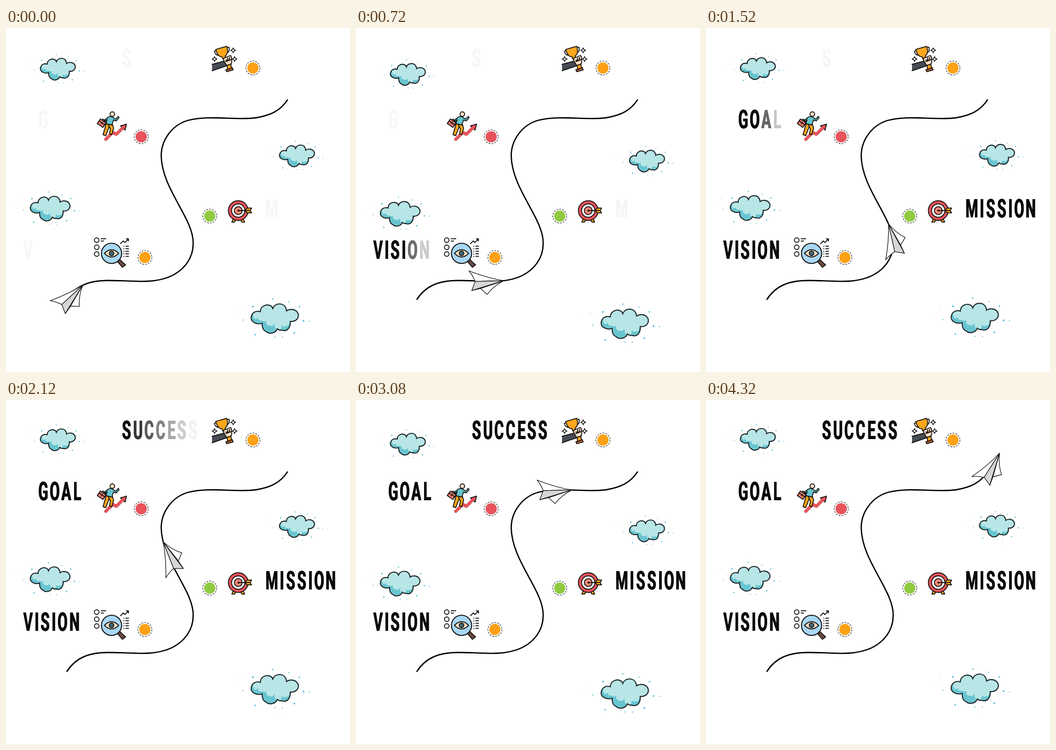
Animation of 748 by 748 pixels, one loop 7.8 s. Source, as an HTML page:

```html
<!DOCTYPE html>
<html lang="en">
<head>
<meta charset="utf-8">
<title>Vision, mission, goal, success</title>
<style>
html, body { margin: 0; width: 100%; height: 100%; overflow: hidden; background: #fff; }
svg { position: absolute; left: 0; top: 0; }
.letter {
  position: absolute; color: #0b0b0c; white-space: pre;
  font: 700 55px/56px Roboto, "Liberation Sans", sans-serif;
  text-shadow: 1px 0 currentColor, -1px 0 currentColor;
  transform: translateX(-50%) scaleX(.57);
}
.ink { stroke: #111; stroke-width: 1.9; stroke-linecap: round; stroke-linejoin: round; fill: none; }
.ink .o { fill: #fda61a; }
.ink .r { fill: #e9535a; }
.ink .skin { fill: #fbdcc0; }
</style>
</head>
<body>
<svg id="stage" width="748" height="748" viewBox="0 0 748 748">
  <defs>
    <path id="puff" vector-effect="non-scaling-stroke" d="M25 42C13 46 0 39 1 29C3 18 12 14 21 17C21 5 35 -2 45 5Q47 7 48 10C53 -3 71 -3 76 8Q78 11 78 15C87 9 99 12 103 21C106 31 98 39 86 38C87 53 78 61 68 57Q62 58 58 54C54 65 39 66 34 60C26 57 25 50 25 42Z"/>
    <clipPath id="puffClip"><use href="#puff"/></clipPath>
    <g id="cloud">
      <use href="#puff" x="3" y="-2" fill="#b9dfe4" opacity=".45"/>
      <use href="#puff" fill="#68c5d0"/>
      <g clip-path="url(#puffClip)" fill="#b8e6e7">
        <path d="M8 32Q-2 10 20 10V-5H108V40H84Q84 50 76 48Q72 52 68 46Q67 58 60 56Q51 56 52 42Q48 50 41 47Q32 46 34 36Q30 40 24 36Q16 38 16 30Q12 34 8 32Z"/>
      </g>
      <use href="#puff" fill="none" stroke="#1d2224" stroke-width="2.2"/>
      <g id="specks" fill="#5cbddc"></g>
    </g>
    <path id="star" d="M0 -5.5Q1 -1 5.5 0Q1 1 0 5.5Q-1 1 -5.5 0Q-1 -1 0 -5.5Z"/>
  </defs>

  <g id="clouds"></g>

  <g class="ink" id="magnifier">
    <circle cx="197.3" cy="461.3" r="5"/><circle cx="197.3" cy="476.8" r="5"/><circle cx="197.3" cy="491.5" r="5"/>
    <path d="M207 458.3H217M207 463.3H212"/>
    <path d="M249 469L255 463L258.5 466.5L266 459M261.5 458.5H266.3V463.3"/>
    <path d="M256.3 474.5V498" stroke-dasharray=".1 5.5" stroke-width="2.2"/>
    <path d="M260.5 474.5H266.5M260.5 480H266.5M260.5 485.5H266.5M260.5 491H266.5M260.5 496.5H266.5"/>
    <path d="M241 506L246 502L260 515L253 520.5Z" fill="#6d4a41"/>
    <circle cx="229.5" cy="490" r="22" fill="#a9d8f5" stroke-width="2.2"/>
    <path d="M214 490Q229.5 474 245 490Q229.5 506 214 490Z" class="skin"/>
    <circle cx="229.5" cy="490" r="5" fill="#416b78"/>
  </g>

  <g class="ink" id="target">
    <path d="M494 415L491 422H497L500 417M516 415L519 422H513L510 417" class="o"/>
    <circle cx="505" cy="397" r="21.5" class="r"/>
    <circle cx="505" cy="397" r="14.5" fill="#fff"/>
    <circle cx="505" cy="397" r="8.5" fill="#f98a75"/>
    <path d="M520 397L524 391.5H534L531 397L534 402H524Z" class="o"/>
    <path d="M505 397H531"/><circle cx="505.5" cy="397" r="1.3" fill="#111"/>
  </g>

  <g class="ink" id="climber">
    <path id="trend" d="M217 242L232 227L240 231L256 215" stroke-width="6.5"/>
    <path d="M249 213L262 209L259 222Z" class="r"/>
    <use href="#trend" style="stroke:#e9535a;stroke-width:3"/>
    <path d="M217 242L232 227L240 231L256 215" stroke="#e9535a" stroke-width="3"/>
    <path d="M218 207L226 210L217 234L211 232Z" class="o"/>
    <path d="M222 209L231 208L234 218L230 232L225 230L227 220Z" class="o"/>
    <path d="M222 194Q228 190 235 196L239 198L244 192L246 195L240 202L234 200L230 211L217 208L220 199L215 205L212 202Z" fill="#67c4cd"/>
    <circle cx="231.2" cy="187.3" r="5" class="skin"/>
    <g transform="rotate(35 208 207)"><path d="M205 201V198H211V201"/><rect x="200.5" y="201" width="15" height="12" fill="#e5786a"/><path d="M201 206H215M208 205V208"/></g>
  </g>

  <g class="ink" id="trophy">
    <path d="M478 91L492 86L494 91L480 95Z" fill="#d9692d"/>
    <path d="M480 78L489 76L490 87L482 90Z" class="o"/>
    <g transform="rotate(-16 470 52)">
      <path d="M459 46H454Q454 57 463 57M482 46H487Q487 57 478 57"/>
      <path d="M458 43H483Q483 60 474 62V67H467V62Q458 60 458 43Z" class="o"/>
    </g>
    <path d="M473 68Q473 64 478 64L487 60Q490 60 490 64L491 74Q490 79 485 80L476 82Z" class="skin"/>
    <path d="M478 70L483 69M482 65V70M486 64V69M489 69L478 73"/>
    <path d="M448 79L474 72L480 82L448 93Z" fill="#484c55" stroke="none"/>
    <path d="M448 79L474 72L480 82L448 93"/>
    <g stroke-width="1.5"><use href="#star" x="494" y="48.5"/><use href="#star" x="453.5" y="67.5"/><use href="#star" x="497" y="67.5"/></g>
  </g>

  <g id="markers"></g>
  <path id="route" fill="none" stroke="#000" stroke-width="2.8" d="M132 591C150 562 178 549 222 549C280 549 312 556 350 543C384 531 407 503 407 469C409 415 338 350 337.5 277C338 242 362 211 395 201C445 188 500 202 545 195C575 190 597 180 612.5 155.5"/>

  <g id="plane" stroke="#1a1a1a" stroke-width="1.4" stroke-linejoin="round" fill="#fff">
    <path d="M36 -31Q6 -13 -36 1Q-24 3 -11 10Z"/>
    <path d="M36 -31L6 14Q16 15 27 15Q26 -8 36 -31Z"/>
    <path d="M36 -31L-11 10L-4 30Z" fill="#d6d6d6"/>
    <path d="M36 -31L-4 30L8 14Z" fill="#e8e8e8"/>
  </g>
</svg>

<script>
const LOOP = 7800, STEP = 40, FLIGHT = 4020, NOSE = 47.5, NOSE_ANGLE = -40.7, FAINT = .028;
const $ = id => document.getElementById(id);

function add(parent, name, attrs) {
  const node = document.createElementNS("http://www.w3.org/2000/svg", name);
  for (const key in attrs) node.setAttribute(key, attrs[key]);
  return parent.appendChild(node);
}

// x, y, radius around the cloud
[[5, 6, 2], [48, -11, 1.6], [83, -4, 1.3], [106, 6, 1.8], [115, 37, 2], [128, 38, 1.2], [95, 63, 1.9],
 [69, 72, 1.2], [53, 72, 1.2], [10, 67, 1.8], [-17, 35, 1.2], [-23, 8, .8], [-38, 22, .6], [64, 84, .5]]
  .forEach(([cx, cy, r]) => add($("specks"), "circle", { cx, cy, r }));

[[74, 66, .74], [594, 254.5, .74], [52, 366, .84], [532, 600, 1]].forEach(([x, y, size]) =>
  add($("clouds"), "use", { href: "#cloud", transform: `translate(${x} ${y}) scale(${size})` }));

[[537, 87, "#fea116"], [294, 236.5, "#e9535a"], [443, 409, "#8fca40"], [302, 499, "#fea116"]].forEach(([cx, cy, fill]) => {
  add($("markers"), "circle", { cx, cy, r: 12.2, fill });
  add($("markers"), "circle", { cx, cy, r: 15.2, fill: "none", stroke: "#111", "stroke-width": 1.1, "stroke-dasharray": "4 2.37" });
});

// start, gap and fade are in ms; xs are letter centres
const words = [
  { text: "VISION", base: 502, start: 4, gap: 130, fade: 330, xs: [47.5, 66.5, 85, 104, 123, 149] },
  { text: "MISSION", base: 412, start: 712, gap: 90, fade: 230, xs: [577.5, 600, 618.5, 642.5, 661.5, 680.5, 706] },
  { text: "GOAL", base: 218, start: 1126, gap: 110, fade: 280, xs: [81, 106, 131, 155] },
  { text: "SUCCESS", base: 85, start: 1710, gap: 65, fade: 420, xs: [262, 286.5, 311, 335.5, 360, 382, 406] }
];
const letters = words.flatMap(word => [...word.text].map((char, i) => {
  const node = document.createElement("span");
  node.className = "letter";
  node.textContent = char;
  node.style.left = word.xs[i] + "px";
  node.style.top = word.base - 46.8 + "px";
  document.body.append(node);
  return { node, start: word.start + i * word.gap, fade: word.fade, rest: i ? 0 : FAINT };
}));

// time, vertical offset of the clouds
const bob = [[0, 0], [720, 11.3], [1060, 16], [1520, -1.3], [1840, -11], [2120, -3], [2400, -1.5],
  [3080, 6.5], [3440, 16], [3800, 5.5], [4000, 2], [4320, -4]];

const slope = i => {
  const a = bob[i - 1], b = bob[i], c = bob[i + 1];
  if (!a || !c || (b[1] - a[1]) * (c[1] - b[1]) < 0) return 0;
  return (c[1] - a[1]) / (c[0] - a[0]);
};

function bobAt(t) {
  const i = bob.findIndex(key => key[0] > t);
  if (i < 0) return bob[bob.length - 1][1];
  const [t0, y0] = bob[i - 1], [t1, y1] = bob[i];
  const span = t1 - t0, u = (t - t0) / span, v = 1 - u;
  return v * v * (1 + 2 * u) * y0 + u * u * (3 - 2 * u) * y1
    + u * v * span * (v * slope(i - 1) - u * slope(i));
}

const route = $("route"), length = route.getTotalLength();
const end = route.getPointAtLength(length), nearEnd = route.getPointAtLength(length - 2);

function routeAt(s) {
  if (s <= length) return route.getPointAtLength(s);
  const k = (s - length) / 2;
  return { x: end.x + (end.x - nearEnd.x) * k, y: end.y + (end.y - nearEnd.y) * k };
}

function draw(t) {
  const s = length * Math.min(t / FLIGHT, 1);
  const centre = routeAt(s), nose = routeAt(s + NOSE);
  const angle = Math.atan2(nose.y - centre.y, nose.x - centre.x) * 180 / Math.PI - NOSE_ANGLE;
  $("plane").setAttribute("transform", `translate(${centre.x} ${centre.y}) rotate(${angle})`);
  $("clouds").setAttribute("transform", `translate(0 ${bobAt(t)})`);
  for (const { node, start, fade, rest } of letters)
    node.style.opacity = Math.max(rest, Math.min(1, (t - start) / fade));
}

const origin = performance.now();
function tick() {
  const t = (performance.now() - origin) % LOOP;
  draw(Math.floor(t / STEP) * STEP);
  requestAnimationFrame(tick);
}
draw(0);
requestAnimationFrame(tick);
</script>
</body>
</html>
```
